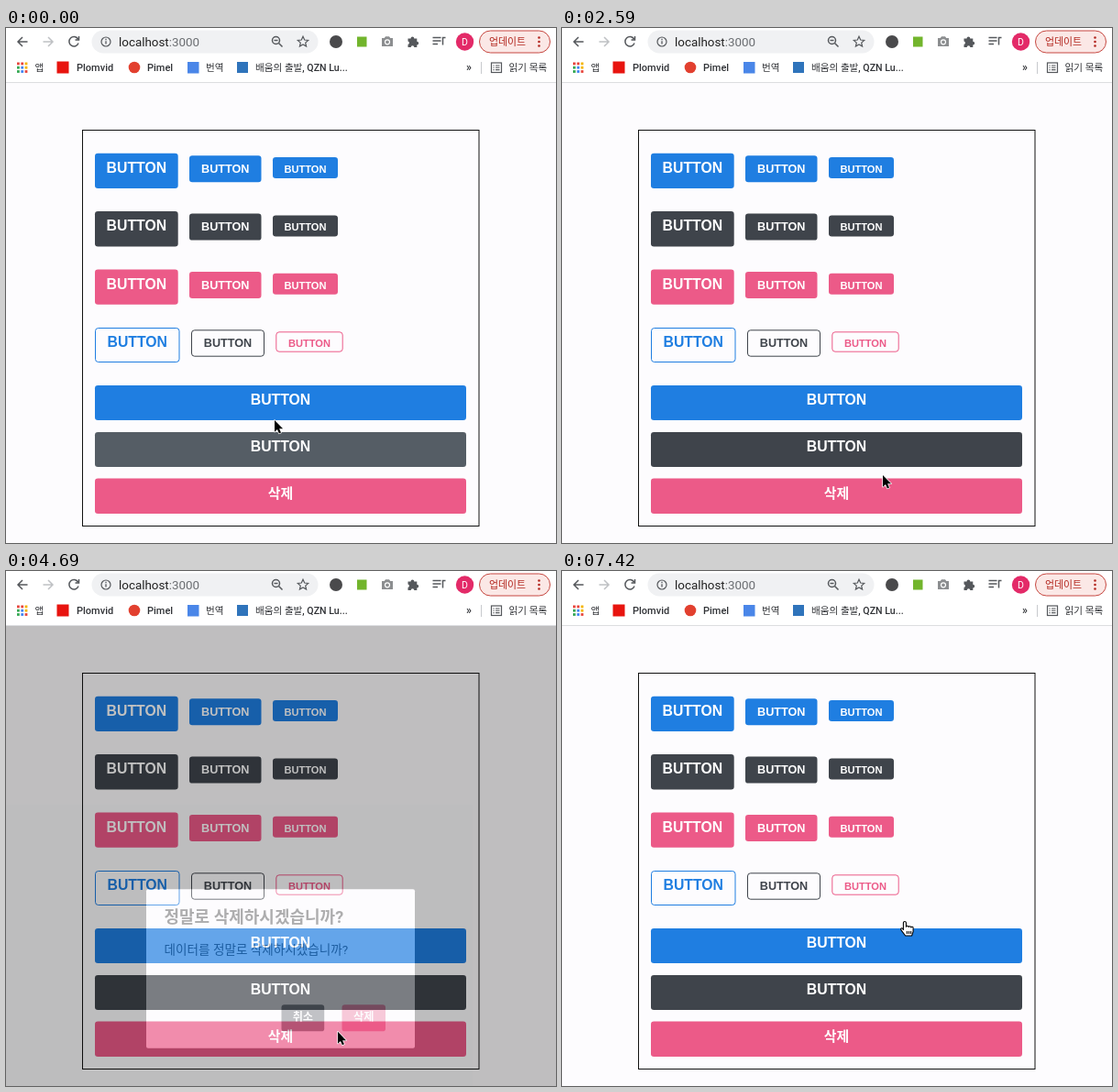
Recreate the animation shown at these times as an HTML page. Size 600 px wide and 562 px high, loop 7490 ms.

```html
<!DOCTYPE html>
<html lang="ko">
<head>
<meta charset="utf-8">
<style>
html, body { margin: 0; height: 100%; overflow: hidden; background: #fdfcfe; }
svg { display: block; width: 600px; height: 562px; font-family: Roboto, "Noto Sans CJK KR", "Noto Sans CJK JP", sans-serif; }
.btn { font-family: "Liberation Sans", "Noto Sans CJK KR", "Noto Sans CJK JP", sans-serif; font-weight: 700; text-anchor: middle; }
.bar { font-size: 10.6px; font-weight: 500; fill: #303236; }
.icon { fill: none; stroke: #55585c; stroke-width: 1.5; }
</style>
</head>
<body>
<svg viewBox="0 0 600 562">
  <rect width="600" height="562" fill="#fdfcfe"/>
  <rect x="83.5" y="111.5" width="432.5" height="432" fill="none" stroke="#111"/>
  <g id="page"></g>
  <g id="overlay">
    <rect y="60" width="600" height="502" fill="#000" fill-opacity=".8"/>
    <g id="dialog">
      <rect x="153" y="238" width="293" height="173.5" rx="2" fill="#fdfcfe"/>
      <text x="172.5" y="274.5" font-size="18" font-weight="700">정말로 삭제하시겠습니까?</text>
      <text x="172.5" y="309" font-size="13.6" fill="#111">데이터를 정말로 삭제하시겠습니까?</text>
    </g>
  </g>
  <g id="toolbar">
    <rect width="600" height="59" fill="#fff"/>
    <path d="M0 59.5H600" stroke="#dcdde0"/>
    <rect x="93.500" y="2.500" width="247" height="25" rx="12.500" fill="#f0f1f3"/>
    <g class="icon">
      <path d="M23.500 15H13M18 10l-5 5 5 5"/>
      <path d="M40.500 15H51M46 10l5 5-5 5" stroke="#bfc1c4"/>
      <path d="M78.500 12A5.200 5.200 0 1 0 79 16.500M79.500 9v4h-4"/>
      <circle cx="109" cy="15" r="5" stroke-width="1.200"/>
      <path d="M109 14.300v3.300M109 11.800v1.400" stroke-width="1.300"/>
      <circle cx="294.500" cy="13.500" r="4"/>
      <path d="M297.500 16.500l4 4M292.500 13.500h4"/>
      <path d="M324 9.300l1.700 3.700 4 .4-3 2.700.9 4-3.600-2.100-3.600 2.100.9-4-3-2.700 4-.4z" stroke-width="1.200"/>
      <path d="M465.500 10.500h9M465.500 14h9M465.500 17.500h5.500M476.500 18.500v-8h3"/>
      <path d="M518.500 37v13" stroke="#c8cacd" stroke-width="1"/>
      <rect x="529.500" y="38" width="11" height="10.500" stroke-width="1.200"/>
      <path d="M531.500 41h1.200M534 41h4.500M531.500 43.300h1.200M534 43.300h4.500M531.500 45.600h1.200M534 45.600h4.500" stroke-width="1.100"/>
    </g>
    <text x="123" y="19.700" font-size="13.400" fill="#222">localhost<tspan fill="#6b6e72">:3000</tspan></text>
    <circle cx="360" cy="15" r="7" fill="#4a4a4c"/>
    <rect x="383" y="9.500" width="10.500" height="11" fill="#72b52c"/>
    <path d="M410 11h2.700l1.300-1.800h4l1.300 1.800h2.700v9h-12z" fill="#8c8e90"/>
    <circle cx="416" cy="15.300" r="2.500" fill="#8c8e90" stroke="#fff" stroke-width="1.200"/>
    <path d="M438.500 11.500h3a1.900 1.900 0 1 1 3.800 0h3v3.200a1.900 1.900 0 1 1 0 3.800v2.500h-3a1.700 1.700 0 0 0-3.600 0h-3.200v-3a1.800 1.800 0 0 0 0-3.500z" fill="#55585c"/>
    <circle cx="500.500" cy="15" r="9.700" fill="#e32a68"/>
    <text x="500.500" y="18.800" font-size="10.500" fill="#fff" text-anchor="middle">D</text>
    <rect x="516.500" y="3" width="77" height="24" rx="12" fill="#fbe8e6" stroke="#c64740"/>
    <text x="527" y="19" font-size="10.900" font-weight="500" fill="#b3271f">업데이트</text>
    <g fill="#b3271f"><circle cx="581.500" cy="10.500" r="1.300"/><circle cx="581.500" cy="15" r="1.300"/><circle cx="581.500" cy="19.500" r="1.300"/></g>
    <rect x="55.500" y="36.500" width="13" height="13" fill="#e8140f"/>
    <circle cx="140" cy="43" r="6.300" fill="#e2402f"/>
    <rect x="198" y="37" width="12.500" height="12.500" fill="#4a86e8"/>
    <rect x="252" y="37" width="12" height="12" fill="#2f74bb"/>
    <g class="bar">
      <text x="31.500" y="47">앱</text>
      <text x="77" y="47" font-size="11">Plomvid</text>
      <text x="154" y="47" font-size="11">Pimel</text>
      <text x="218" y="47">번역</text>
      <text x="272" y="47">배움의 출발, QZN Lu...</text>
      <text x="502" y="46.500" font-size="12">»</text>
      <text x="548.500" y="47">읽기 목록</text>
    </g>
  </g>
  <g id="cursor" stroke-linejoin="round">
    <path id="arrow" d="M0 0v12.800l3-2.700 1.900 4.300 2.100-.9-1.900-4.200h4z" stroke="#fff" stroke-width="1.400" paint-order="stroke"/>
    <path id="hand" d="M-1.600 8.500V1a1.500 1.500 0 0 1 3 0v4.200a1.400 1.400 0 0 1 2.700.2a1.400 1.400 0 0 1 2.600.5a1.300 1.300 0 0 1 2.400.9v3.600l-1.500 4.600h-7l-4.800-6.300c-.8-1.400.8-2.600 1.900-1.400zM2.400 10v3M4.500 10v3M6.600 10v3" fill="#fff" stroke="#000" stroke-width="1.100"/>
    <g id="beam" fill="none">
      <path d="M-3-7q3 0 3 2V5q0 2-3 2M3-7Q0-7 0-5V5q0 2 3 2M-1.500 2h3" stroke="#fff" stroke-width="2.800"/>
      <path d="M-3-7q3 0 3 2V5q0 2-3 2M3-7Q0-7 0-5V5q0 2 3 2M-1.500 2h3" stroke="#111" stroke-width="1.200"/>
    </g>
  </g>
</svg>
<script>
const LOOP = 7490, STEP = 70, FADE = 250, SLIDE = 158;
const $ = id => document.getElementById(id);
const add = (parent, tag, attrs, text = '') => {
  const el = document.createElementNS('http://www.w3.org/2000/svg', tag);
  for (const k in attrs) el.setAttribute(k, attrs[k]);
  el.textContent = text;
  return parent.appendChild(el);
};

// Each palette: normal, hovered, pressed
const blue = ['#1f7ee1', '#3c94ea', '#1868bd'];
const gray = ['#3f444b', '#555d65', '#2c3035'];
const pink = ['#ec5a88', '#f283a7', '#e73168'];

function button(parent, x, y, w, h, colors, size, base, label = 'BUTTON', outline = false) {
  const rect = add(parent, 'rect', { x, y, width: w, height: h, rx: 3.2, fill: outline ? 'none' : colors[0] });
  if (outline) rect.setAttribute('stroke', colors[0]);
  add(parent, 'text', { class: 'btn', x: x + w / 2, y: base, 'font-size': size, fill: outline ? colors[0] : '#fff' }, label);
  return { rect, x, y, w, h, colors };
}

const page = $('page'), dialog = $('dialog');
[blue, gray, pink].forEach((c, i) => {
  const y = 136.7 + i * 63.4;
  button(page, 97, y, 90.7, 38.3, c, 15.8, y + 21.3);
  button(page, 200, y + 2.5, 78.5, 29, c, 12.65, y + 21.3);
  button(page, 291, y + 4.3, 71, 23, c, 11.1, y + 21.3);
});
button(page, 97.5, 327.5, 91.5, 37, blue, 15.8, 348.2, 'BUTTON', true);
button(page, 202.5, 329.8, 79, 28.4, gray, 12.65, 348.2, 'BUTTON', true);
button(page, 294.8, 331.8, 72.4, 21.4, pink, 11.1, 348.2, 'BUTTON', true);
const bars = [
  button(page, 97, 390, 405, 38, blue, 15.8, 411),
  button(page, 97, 441, 405, 38, gray, 15.8, 462),
  button(page, 97, 491.5, 405, 38.5, pink, 14.9, 512.5, '삭제')
];
const choices = [
  button(dialog, 300.5, 364, 46.7, 29, gray, 12.2, 381.7, '취소'),
  button(dialog, 366.5, 364, 47.5, 29, pink, 12.2, 381.7, '삭제')
];

['#e8453c', '#e8453c', '#f5b400', '#34a853', '#4285f4', '#f5b400', '#34a853', '#4285f4', '#e8453c'].forEach((fill, i) =>
  add($('toolbar'), 'rect', { x: 12 + i % 3 * 4.3, y: 37.5 + Math.floor(i / 3) * 4.3, width: 2.8, height: 2.8, fill }));

// Clicks alternately open and close the dialog
const clicks = [1000, 2060, 2840, 3920, 4640, 5393, 6113, 6760];
const path = [
  [-100, 292, 455], [0, 293, 428], [250, 296, 424], [850, 340, 503], [1050, 340, 503],
  [1820, 337, 393], [1960, 334, 384], [2080, 334, 384], [2590, 350, 488], [2700, 353, 500],
  [2880, 353, 500], [3500, 387, 374], [3990, 387, 374], [4500, 362, 503], [4680, 362, 503],
  [5180, 332, 387], [5480, 332, 387], [6000, 360, 494], [6230, 360, 494], [6650, 374, 383], [LOOP, 374, 383]
];

function pointer(t) {
  const i = path.findIndex(p => p[0] > t), [t0, x0, y0] = path[i - 1], [t1, x1, y1] = path[i];
  const f = (t - t0) / (t1 - t0), s = f * f * (3 - 2 * f);
  return [x0 + (x1 - x0) * s, y0 + (y1 - y0) * s];
}

function openness(t) {
  const n = clicks.filter(c => c <= t).length;
  if (!n) return 0;
  const p = 1 - (1 - Math.min(1, (t - clicks[n - 1]) / FADE)) ** 1.65;
  return n % 2 ? p : 1 - p;
}

const inside = (b, x, y) => x >= b.x && x < b.x + b.w && y >= b.y && y < b.y + b.h;
const paragraph = { x: 172, y: 294, w: 201, h: 31 };

function draw(t) {
  const open = openness(t), shift = (1 - open) * SLIDE;
  $('overlay').setAttribute('opacity', open);
  $('overlay').style.display = open ? '' : 'none';
  dialog.setAttribute('transform', `translate(0 ${shift})`);

  const [x, y] = pointer(t), [hx, hy] = pointer(t - STEP);
  const active = open ? choices : bars, dy = open ? shift : 0;
  const pressed = clicks.some(c => c > t && c - t < 120);
  for (const b of [...bars, ...choices]) {
    const over = active.includes(b) && inside(b, hx, hy - dy);
    b.rect.setAttribute('fill', b.colors[over ? (pressed ? 2 : 1) : 0]);
  }

  const shape = t > clicks[7] || active.some(b => inside(b, x, y - dy)) ? 'hand'
    : open && inside(paragraph, x, y - dy) ? 'beam' : 'arrow';
  for (const id of ['arrow', 'hand', 'beam']) $(id).style.display = id === shape ? '' : 'none';
  $('cursor').setAttribute('transform', `translate(${x} ${y})`);
}

function tick() {
  draw(Math.floor(performance.now() % LOOP / STEP) * STEP);
  requestAnimationFrame(tick);
}
tick();
</script>
</body>
</html>
```
